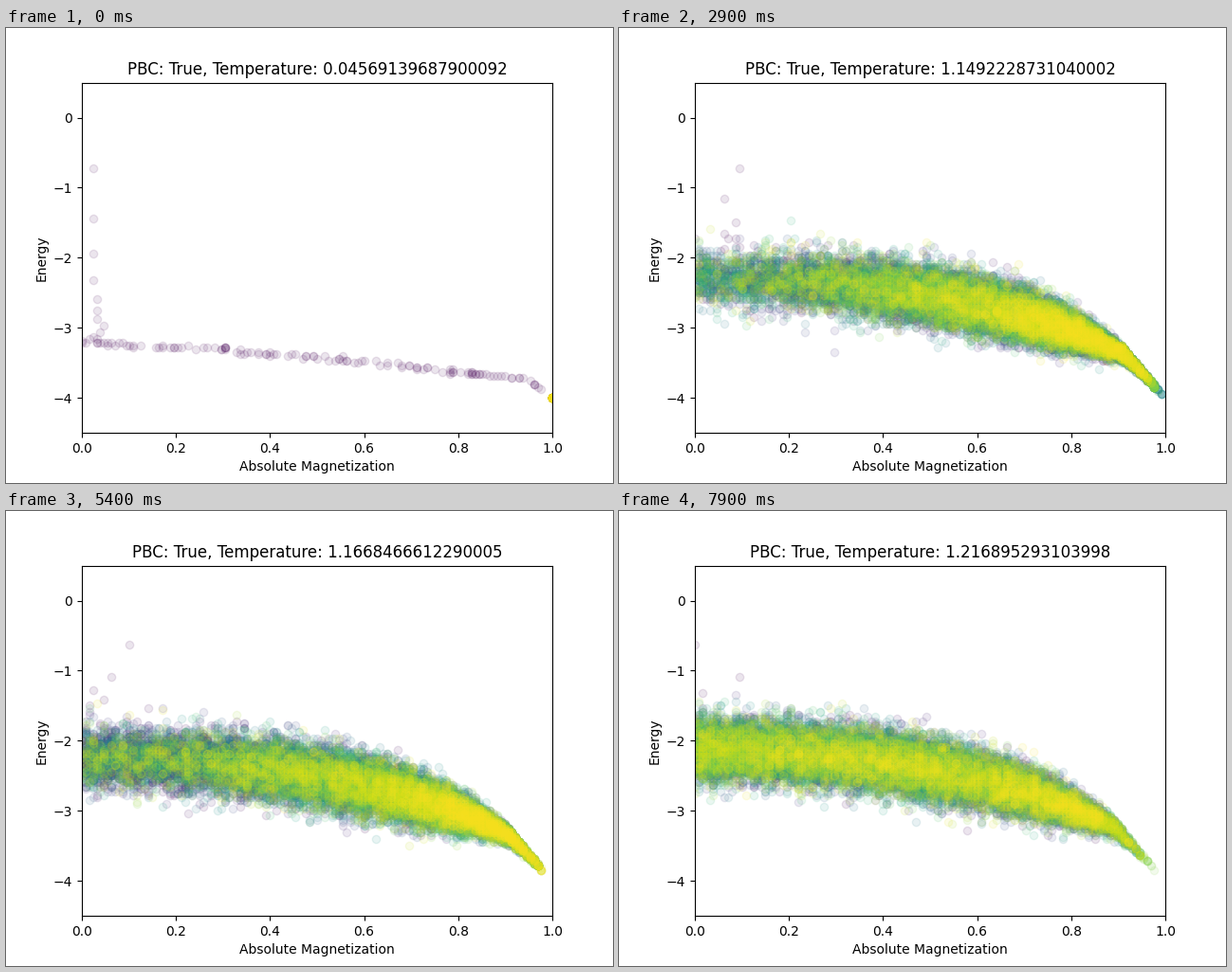
A matplotlib script for the animation above (8 s loop, 640 by 480 pixels).

```python
import numpy as np
import matplotlib.pyplot as plt
from matplotlib.animation import FuncAnimation

FRAMES, STEPS, CHUNKS = 80, 24000, 60
SIZE = STEPS // CHUNKS
rng = np.random.default_rng(16)
step = np.arange(STEPS)

# Quintic temperature sweep, dense around the critical point
sweep = np.arange(-2.57, 1.4, .05)[:FRAMES]
temps = .01 * sweep ** 5 + 1.1668462899360006


def correlated(tau):
    """Unit-variance AR(1) noise, one column per frame."""
    a = np.exp(-1 / tau)
    noise = rng.normal(size=(STEPS, FRAMES))
    noise[1:] *= np.sqrt(1 - a * a)
    for i in range(1, STEPS):
        noise[i] += a * noise[i - 1]
    return noise


order = correlated(60)
start_e = rng.normal(-.7, .12, FRAMES)


def trajectory(k):
    """Magnetization and energy of one run from a random start."""
    t = temps[k]
    noise = np.random.default_rng(k).normal(size=STEPS)
    cold = np.clip((1.1 - t) / .4, 0, 1)
    ramp = np.clip((step - 10) / (40 + 90 * cold), 0, 1)
    relaxing = ramp < 1

    # Magnetization fluctuates around its mean field and folds at zero
    wave = (1 + np.cos(2 * np.pi * (k - 21) / 39)) / 2
    z = order[:, k] + .7 * wave ** 2 * (2 * step / STEPS - 1)
    m = np.tanh(2 / t - .41 * t ** 5.5 + .45 * z) * ramp
    wobble = .04 * order[:, k] + .06 * noise * (1 - cold)
    m = np.minimum(np.abs(m + wobble * relaxing), 1)
    m = np.round(m * 128) / 128

    # Energy above the ground state
    d = 1 - m * m
    amp = 1.76 + 2.4 * max(t - 1.167, -.1)
    hot_e = np.minimum(amp * d ** .57, 7.2 * (1 - m))
    cold_e = np.minimum(.77 - .55 * m ** 1.5, 5 * (1 - m))
    mix = cold * relaxing
    e = -4 + (1 - mix) * hot_e + mix * cold_e
    e += .21 * np.tanh((d / .45) ** 1.5) * noise * (1 - .9 * mix)
    e += (start_e[k] - e) * np.exp(-step / 3)
    return m, np.round(np.clip(e, -4, 4 - 8 * m) * 32) / 32


fig, ax = plt.subplots(figsize=(6.4, 4.8), dpi=100)
ax.set(xlim=(0, 1), ylim=(-4.5, .5), yticks=range(-4, 1),
       xlabel="Absolute Magnetization", ylabel="Energy")
title = ax.set_title("")

# Samples are coloured by time; each chunk shares one colour
colors = plt.get_cmap("viridis")(np.linspace(0, 1, CHUNKS))
layers = [ax.plot([], [], "o", ms=6, mew=1, color=c, alpha=.1)[0]
          for c in colors]


def draw(k):
    m, e = trajectory(k)
    for i, layer in enumerate(layers):
        part = slice(i * SIZE, (i + 1) * SIZE)
        layer.set_data(m[part], e[part])
    title.set_text(f"PBC: True, Temperature: {temps[k]}")
    return [*layers, title]


anim = FuncAnimation(fig, draw, frames=FRAMES, interval=100,
                     repeat=True, repeat_delay=0)
plt.show()
```
